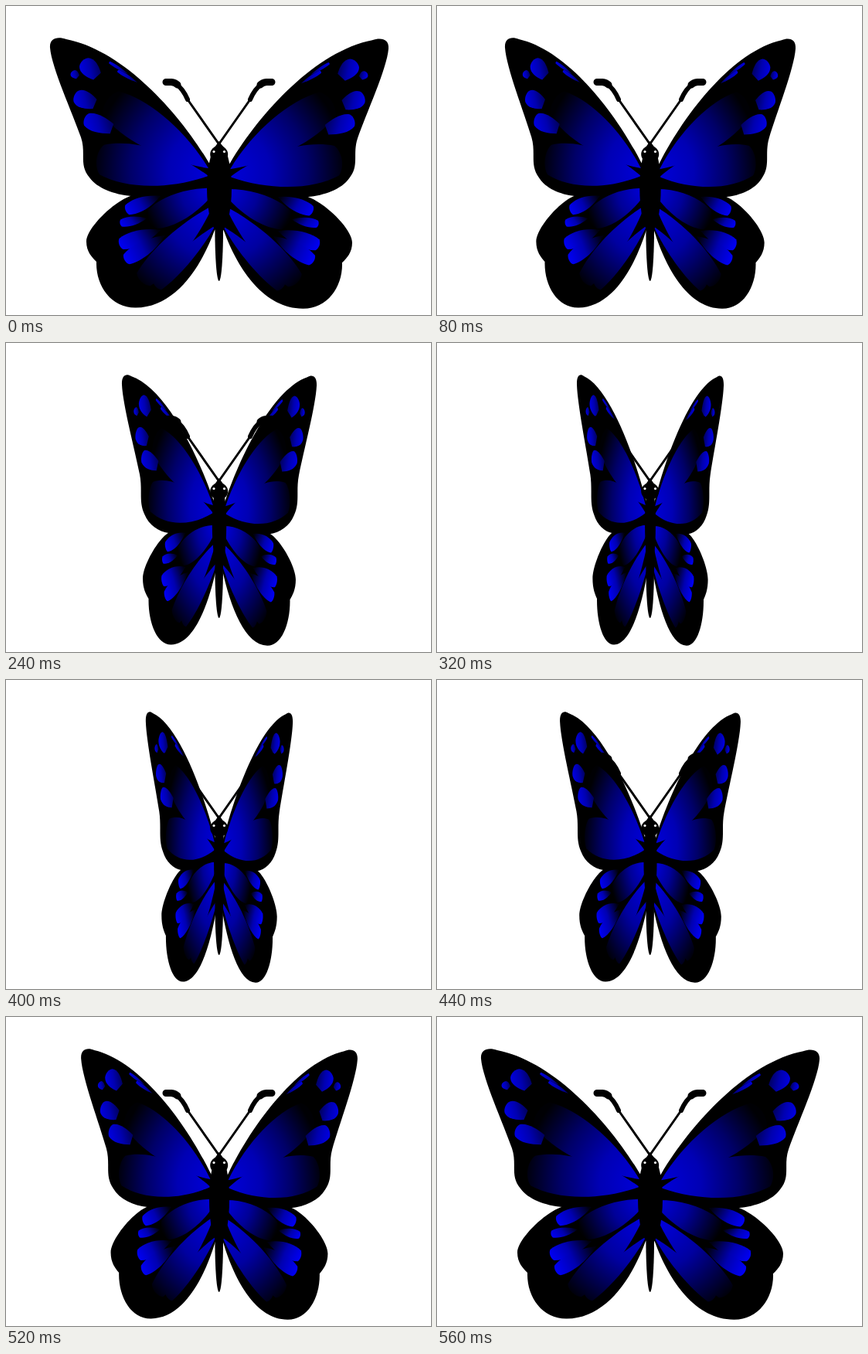
These frames come from a looping animation (550 px wide and 400 px high, 0.6 s). An HTML page:

```html
<!DOCTYPE html>
<html lang="en">
<head>
<meta charset="utf-8">
<title>Blue butterfly</title>
<style>
  html, body { margin: 0; width: 100%; height: 100%; overflow: hidden; background: #fff; }
  svg { display: block; width: 550px; height: 400px; }
</style>
</head>
<body>
<svg viewBox="0 0 550 400">
  <defs>
    <radialGradient id="fore" gradientUnits="userSpaceOnUse" cx="268" cy="214" r="165">
      <stop offset="0" stop-color="#0000dc"/>
      <stop offset=".35" stop-color="#0000b4"/>
      <stop offset=".65" stop-color="#000068"/>
      <stop offset=".95" stop-color="#000004"/>
    </radialGradient>
    <radialGradient id="disc" gradientUnits="userSpaceOnUse" cx="266" cy="238" r="88">
      <stop offset="0" stop-color="#0000dc"/>
      <stop offset=".45" stop-color="#000098"/>
      <stop offset="1" stop-color="#000004"/>
    </radialGradient>
    <radialGradient id="hind" gradientUnits="userSpaceOnUse" cx="268" cy="264" r="134">
      <stop offset="0" stop-color="#0000e0"/>
      <stop offset=".45" stop-color="#0000a0"/>
      <stop offset="1" stop-color="#000004"/>
    </radialGradient>
    <linearGradient id="spot" x1="0" y1=".6" x2="1" y2=".4">
      <stop offset="0" stop-color="#0000e4"/>
      <stop offset=".5" stop-color="#0000b0"/>
      <stop offset="1" stop-color="#000058"/>
    </linearGradient>
    <linearGradient id="edge" x1="0" y1=".6" x2="1" y2=".3">
      <stop offset="0" stop-color="#0000f0"/>
      <stop offset=".45" stop-color="#0000b0"/>
      <stop offset="1" stop-color="#000010"/>
    </linearGradient>
    <g id="wing">
      <path d="M276 222L262 202C222 135 150 57 78 43C66 39 56 42 57 54C59 80 86 138 97 170
        C104 191 94 205 108 222C118 236 140 244 162 246L276 250Z"/>
      <path d="M276 225L162 245.5C138 254 104 288 104 305C104 318 111 325 117 331
        C116 362 136 391 168 390.5C217 390 251 342 270 290L276 280Z"/>
    </g>
    <g id="feeler" fill="none" stroke="#000" stroke-linecap="round" stroke-linejoin="round">
      <path d="M207 98.5L214 98.5Q219 99 222 102" stroke-width="9"/>
      <path d="M220 101Q229 107 235 121" stroke-width="6"/>
      <path d="M235 121L275 178" stroke-width="3"/>
    </g>
  </defs>
  <g id="wings">
    <use href="#wing"/>
    <use href="#wing" transform="matrix(-1 0 0 1 552 1.2)"/>
    <ellipse cx="276" cy="236" rx="16" ry="57"/>
  </g>
  <path d="M275.7 175L267 187H284.4Z"/>
  <ellipse cx="275.7" cy="192" rx="11.5" ry="11"/>
  <ellipse cx="275.7" cy="290" rx="5.3" ry="66"/>
  <use href="#feeler"/>
  <use href="#feeler" transform="matrix(-1 0 0 1 551 0)"/>
  <g fill="#fff">
    <circle cx="269" cy="188.5" r="1.6"/>
    <circle cx="282.5" cy="188.5" r="1.6"/>
  </g>
</svg>
<script>
const wing = document.getElementById('wing');
const wings = document.getElementById('wings');

// Cell running from an inner tip to a blunt outer end; w is half its width,
// tip the share of that width kept at the inner end.
function petal(fill, tip, x0, y0, x1, y1, w) {
  const len = Math.hypot(x1 - x0, y1 - y0);
  const angle = Math.atan2(y1 - y0, x1 - x0) * 180 / Math.PI;
  const a = tip * w, b = 0.75 * w, c = 1.25 * w, cap = len + 0.35 * w;
  const path = document.createElementNS('http://www.w3.org/2000/svg', 'path');
  const place = turn(x0, y0, angle);
  const pt = (x, y) => place(x, y).map(v => v.toFixed(2)).join(' ');
  path.setAttribute('d', `M${pt(0, -a)}
    C${pt(0.35 * len, -w)} ${pt(0.75 * len, -c)} ${pt(len, -b)}
    C${pt(cap, -b / 2)} ${pt(cap, b / 2)} ${pt(len, b)}
    C${pt(0.75 * len, c)} ${pt(0.35 * len, w)} ${pt(0, a)}Z`);
  path.setAttribute('fill', `url(#${fill})`);
  wing.append(path);
}

function turn(x0, y0, angle) {
  const r = angle * Math.PI / 180, cos = Math.cos(r), sin = Math.sin(r);
  return (x, y) => [x0 + x * cos - y * sin, y0 + x * sin + y * cos];
}

// Forewing
petal('fore', 0, 262, 210, 136, 126, 25);
petal('fore', 0, 262, 220, 124, 199, 26);
petal('spot', 0.6, 118, 91, 101, 73, 11);
petal('spot', 0.6, 93, 92, 86, 86, 5);
petal('spot', 0.6, 115, 127, 91, 117, 11);
petal('spot', 0.6, 137, 159, 104, 147, 11);
petal('spot', 0, 170, 99, 145, 84, 2.5);
petal('spot', 0, 158, 88, 134, 73, 2);

// Hindwing
petal('disc', 0, 274, 236, 190, 276, 18);
petal('hind', 0, 268, 258, 178, 354, 16);
petal('hind', 0, 271, 284, 196, 362, 10);
petal('edge', 0, 200, 246, 157, 264, 9);
petal('edge', 0, 182, 275, 149, 281, 6);
petal('edge', 0, 200, 290, 149, 308, 10);
petal('edge', 0, 206, 297, 156, 328, 10);

const STEP = 40, COUNT = 15, LOW = 9, MIN = 0.363;

// Wings close evenly, then open with an accelerating ease.
function span(i) {
  if (i <= LOW) return 1 - (1 - MIN) * i / LOW;
  const u = (i - LOW) / (COUNT - 1 - LOW);
  return MIN + (1 - MIN) * u * (0.45 + 0.55 * u);
}

const start = performance.now();
function draw(now) {
  const i = Math.floor(Math.max(0, now - start) / STEP) % COUNT;
  wings.setAttribute('transform', `translate(276 0) scale(${span(i)} 1) translate(-276 0)`);
  requestAnimationFrame(draw);
}
draw(start);
</script>
</body>
</html>
```
